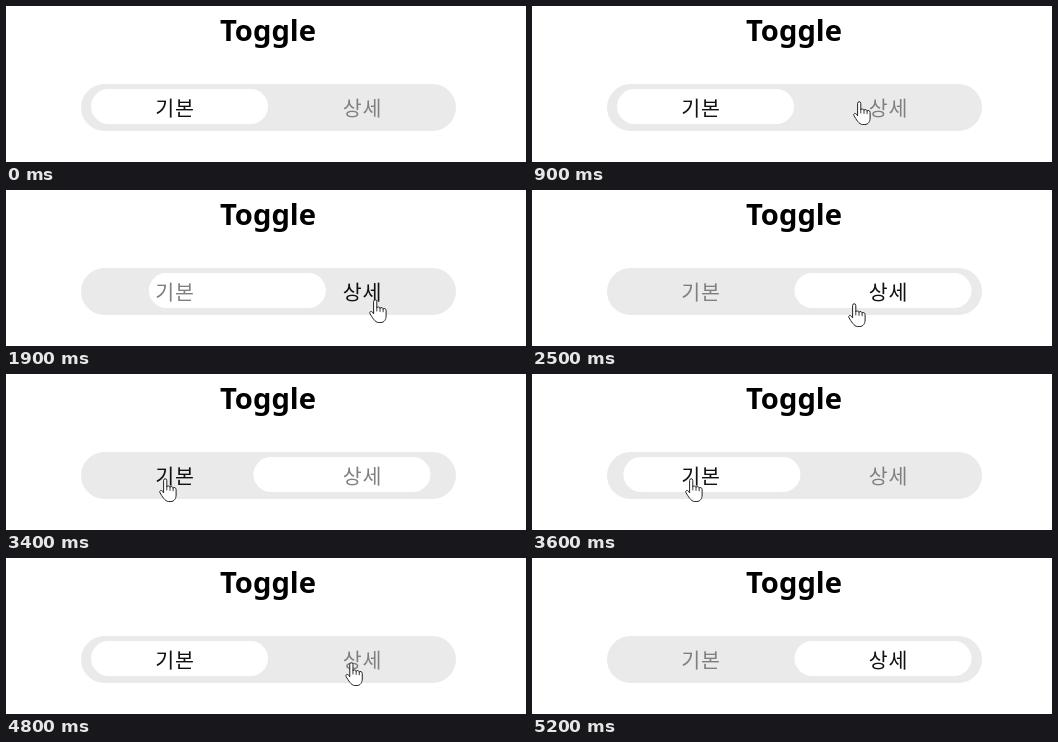
An HTML page that plays this animation: 520x156 px, repeating every 6100 ms.

```html
<!DOCTYPE html>
<html lang="ko">
<head>
<meta charset="utf-8">
<title>Toggle</title>
<style>
  html, body { margin: 0; width: 100%; height: 100%; overflow: hidden; background: #fff; }
  svg { display: block; width: 520px; height: 156px; }
  text { text-anchor: middle; }
  .title { font: 700 29.2px "Noto Sans", "Open Sans", sans-serif; }
  .label { font: 300 20.6px "Noto Sans CJK KR", "Noto Sans CJK", sans-serif; letter-spacing: .8px; fill: #808080; }
  .label.on { fill: #111; }
</style>
</head>
<body>
<svg viewBox="0 0 520 156">
  <text class="title" x="262" y="35">Toggle</text>
  <rect x="75" y="78" width="375" height="47" rx="23.5" fill="#eaeaea"/>
  <rect id="thumb" y="83" width="177" height="35" rx="17.5" fill="#fff"/>
  <text class="label" x="169" y="109.5">기본</text>
  <text class="label" x="356.5" y="109.5">상세</text>
  <g id="hand" stroke="#222" stroke-linejoin="round" stroke-linecap="round">
    <path fill="#fff" d="M4.6 14.5V2.4a1.6 1.6 0 0 1 3.2 0V9c0-1.4 3.2-1.4 3.2 .4c0-1.3 3.1-1.2 3.1 .8c0-1.2 3-1 3 1.2V17c0 3.5-2 6.5-5.2 6.5H9.5C6 23.5 3 18 1 14.7C0 12.7 2 11.6 3.3 13z"/>
    <path fill="none" stroke-width=".9" d="M7.8 9v3M11 9.6v2.8M14.1 10.4v2.4"/>
  </g>
</svg>
<script>
  const LOOP = 6100, STEP = 100, SLIDE = 300;
  const thumb = document.getElementById('thumb');
  const hand = document.getElementById('hand');
  const labels = document.querySelectorAll('.label');

  // each click flips the selected side
  const clicks = [1836, 3372, 4826];

  // pointer stops: ms, left, top
  const stops = [
    [900, 321, 95], [1400, 363, 109],
    [2400, 363, 109], [2500, 316, 113], [2800, 153, 104],
    [4200, 153, 104], [4300, 180, 104], [4900, 371, 104], [5200, 371, 107]
  ];

  const mix = (a, b, k) => a + (b - a) * k;
  const bezier = (a, b, u) => 3 * a * u * (1 - u) ** 2 + 3 * b * u * u * (1 - u) + u ** 3;

  // CSS "ease"
  function ease(x) {
    if (x >= 1) return 1;
    let lo = 0, hi = 1;
    for (let i = 0; i < 24; i++) {
      const mid = (lo + hi) / 2;
      if (bezier(.25, .25, mid) < x) lo = mid; else hi = mid;
    }
    return bezier(.1, 1, lo);
  }

  function drawToggle(t) {
    const past = clicks.filter(c => c <= t);
    const side = past.length % 2;
    const k = past.length ? ease((t - past.at(-1)) / SLIDE) : 1;
    thumb.setAttribute('x', 85 + 177.5 * mix(1 - side, side, k));
    labels.forEach((label, i) => label.classList.toggle('on', i === side));
  }

  function drawHand(t) {
    const next = stops.findIndex(s => s[0] > t);
    hand.style.visibility = next > 0 ? 'visible' : 'hidden';
    if (next < 1) return;
    const [t0, x0, y0] = stops[next - 1], [t1, x1, y1] = stops[next];
    const k = (t - t0) / (t1 - t0);
    hand.setAttribute('transform', `translate(${mix(x0, x1, k)} ${mix(y0, y1, k)})`);
  }

  const begin = performance.now();
  function tick() {
    const elapsed = (performance.now() - begin) % LOOP;
    const t = Math.floor(elapsed / STEP) * STEP;
    drawToggle(t);
    drawHand(t);
    requestAnimationFrame(tick);
  }
  tick();
</script>
</body>
</html>
```
